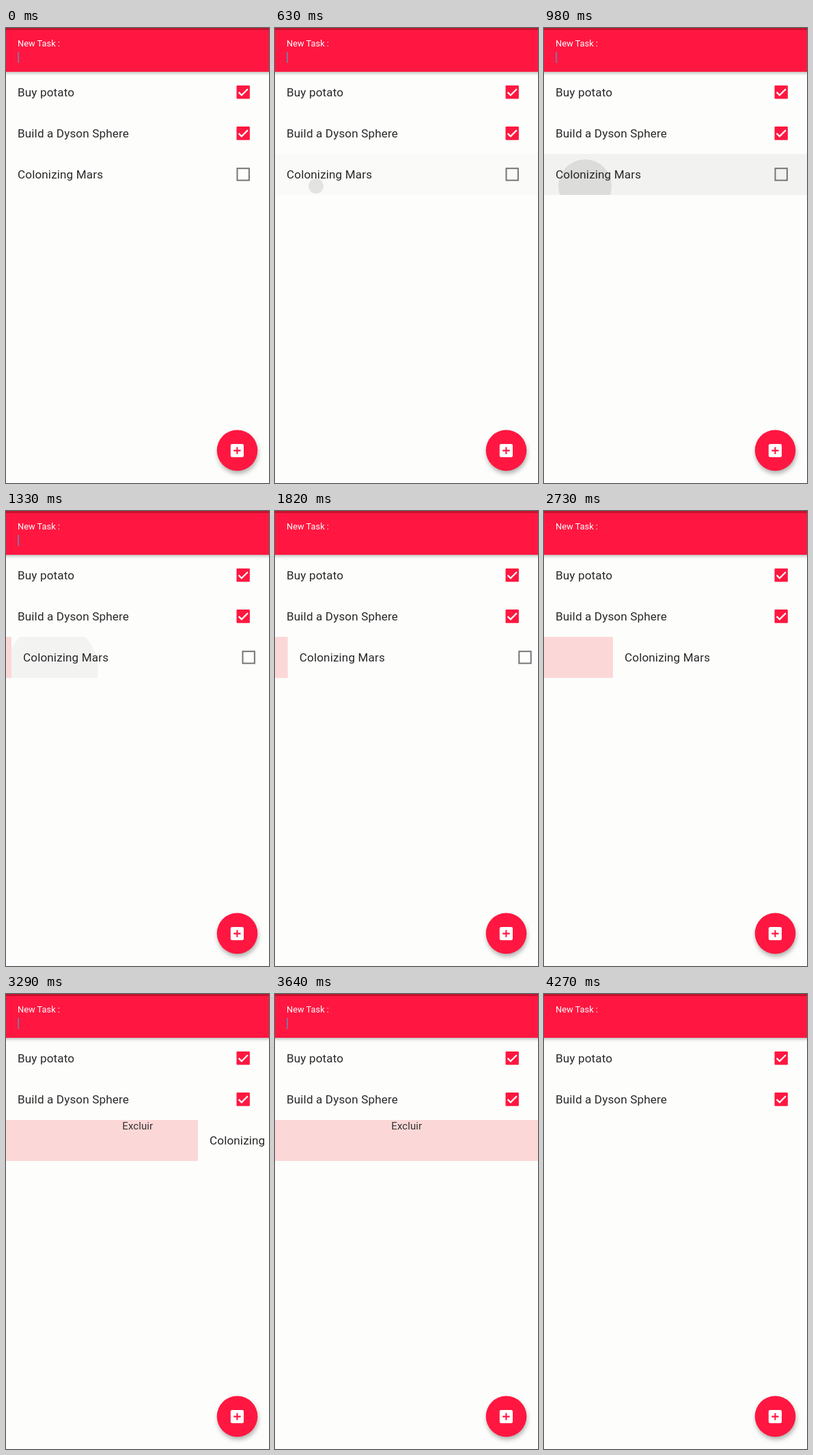
Write an HTML page that moves like this. It is 385x665 px and loops after 4340 ms.

```html
<!DOCTYPE html>
<html lang="en">
<head>
<meta charset="utf-8">
<title>Task list</title>
<style>
  html, body { margin: 0; width: 100%; height: 100%; overflow: hidden; background: #fdfefc; }
  svg { display: block; width: 385px; height: 665px; font-family: Roboto, "Noto Sans", sans-serif; }
  .task { font-size: 17.1px; letter-spacing: .13px; fill: #282828; }
  .bar { filter: drop-shadow(0 2px 2px rgba(0, 0, 0, .28)); }
  .fab { filter: drop-shadow(1px 4px 3px rgba(0, 0, 0, .3)); }
  .red { fill: #ff1741; }
</style>
</head>
<body>
<svg viewBox="0 0 385 665">
  <defs>
    <clipPath id="rowClip"><rect y="184" width="385" height="60"/></clipPath>
    <clipPath id="backClip"><rect id="backRect" y="184" width="0" height="60"/></clipPath>
    <g id="checked">
      <rect class="red" x="337.5" y="-9.8" width="19.4" height="19.6" rx="1"/>
      <path d="M340.6 .2l4.3 4.3 9-9" fill="none" stroke="#fff" stroke-width="2.2"/>
    </g>
  </defs>

  <rect width="385" height="665" fill="#fdfefc"/>
  <rect class="red bar" x="-5" y="-5" width="395" height="69"/>
  <rect width="385" height="3" fill="#c4122f"/>
  <text x="17" y="27" font-size="12.85" fill="#fff">New Task :</text>
  <rect id="cursor" x="17" y="35" width="2" height="16" fill="#86709f"/>

  <text class="task" x="17" y="100">Buy potato</text>
  <use href="#checked" y="93.7"/>
  <text class="task" x="17" y="160">Build a Dyson Sphere</text>
  <use href="#checked" y="153.9"/>

  <g clip-path="url(#backClip)">
    <g id="back">
      <rect y="184" width="385" height="60" fill="#fbd8d7"/>
      <text x="192.8" y="198" font-size="15" letter-spacing=".1" text-anchor="middle" fill="#333">Excluir</text>
    </g>
  </g>

  <g id="row">
    <g clip-path="url(#rowClip)">
      <rect id="glow" y="184" width="385" height="60"/>
      <circle id="ripple" cx="60" cy="231"/>
    </g>
    <text class="task" x="17" y="220">Colonizing Mars</text>
    <rect x="338.5" y="205.2" width="17.4" height="17.4" fill="none" stroke="#757575" stroke-width="2"/>
  </g>

  <circle class="red fab" cx="338.5" cy="617.4" r="29.8"/>
  <rect x="328.8" y="608" width="19.2" height="19.2" rx="2.2" fill="#fff"/>
  <path d="M333.2 617.6h10.4M338.4 612.4v10.4" stroke="#ff1741" stroke-width="2.1"/>
</svg>
<script>
  const LOOP = 4340, STEP = 70, BLINK = 1300, ROW_H = 60;
  const $ = id => document.getElementById(id);
  const set = (id, attrs) => {
    for (const k in attrs) $(id).setAttribute(k, attrs[k]);
  };
  const clamp = v => Math.min(1, Math.max(0, v));
  const ramp = (t, a, b) => clamp((t - a) / (b - a));
  const ease = u => u * u * (3 - 2 * u);

  // Finger position over time, joined by a smooth curve
  const drag = [[1150, 0], [1330, 8], [1680, 16], [2310, 35], [2730, 101],
                [3290, 281], [3430, 340], [3570, 385]];

  function slope(i) {
    if (i === 0 || i === drag.length - 1) return 0;
    const [a, b] = [drag[i - 1], drag[i + 1]];
    return (b[1] - a[1]) / (b[0] - a[0]);
  }

  function offset(t) {
    if (t <= drag[0][0]) return 0;
    const i = drag.findIndex(p => p[0] >= t) - 1;
    if (i < 0) return 385;
    const [t0, x0] = drag[i], [t1, x1] = drag[i + 1];
    const d = t1 - t0, u = (t - t0) / d, v = 1 - u;
    return x0 * v * v * (1 + 2 * u) + x1 * u * u * (3 - 2 * u)
         + d * u * v * (slope(i) * v - slope(i + 1) * u);
  }

  function draw(t) {
    const x = offset(t);
    const h = ROW_H * (1 - ease(ramp(t, 3740, 3990)));
    set('row', { transform: `translate(${x} 0)` });
    set('backRect', { width: x, height: h });
    set('back', { transform: `translate(0 ${(h - ROW_H) / 2})` });

    const pressed = t >= 560;
    set('glow', { opacity: .045 * ramp(t, 560, 800) * (1 - ramp(t, 1050, 1300)) });
    set('ripple', {
      r: pressed ? 11 + (t - 630) * .08 : 0,
      opacity: .09 * (1 - .55 * ramp(t, 1050, 1330)) * (1 - ramp(t, 1330, 1540))
    });

    const phase = (t + BLINK - 610) % BLINK;
    set('cursor', { opacity: phase < 745 ? 1 : 0 });
  }

  const start = performance.now();
  function tick() {
    const t = (performance.now() - start) % LOOP;
    draw(Math.floor(t / STEP) * STEP);
    requestAnimationFrame(tick);
  }
  tick();
</script>
</body>
</html>
```
